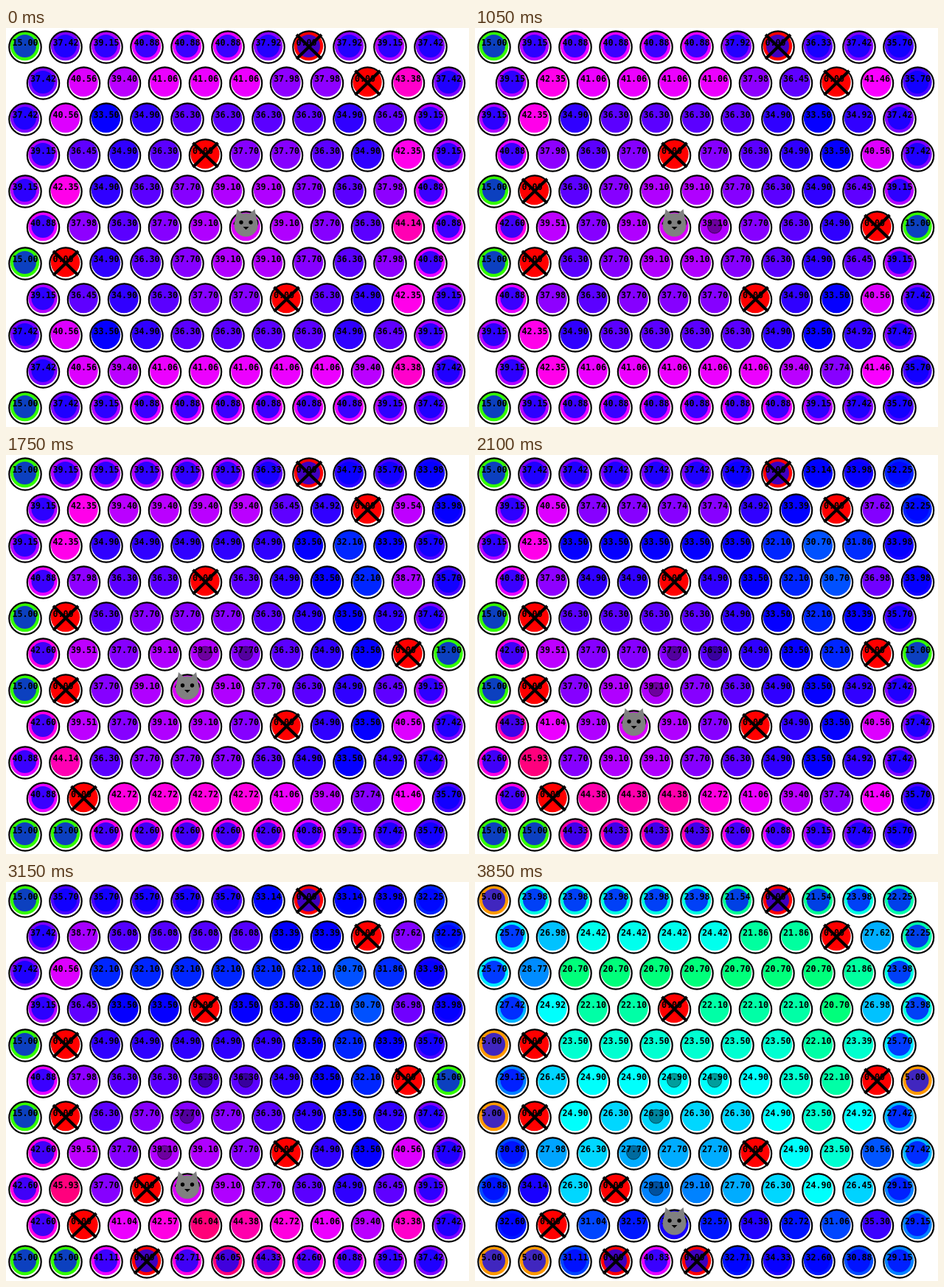
Recreate the animation shown at these times as an HTML page with a canvas. Size 628 px wide and 542 px high, loop 4200 ms.

```html
<!DOCTYPE html>
<html lang="en">
<head>
<meta charset="utf-8">
<title>Cat on a hex board</title>
<style>
  html, body { margin: 0; width: 100%; height: 100%; overflow: hidden; background: #fff; }
  canvas { display: block; width: 628px; height: 542px; }
</style>
</head>
<body>
<canvas id="board" width="628" height="542"></canvas>
<script>
const STEP_MS = 350, SIZE = 11, LAST = SIZE - 1;
const ctx = document.getElementById('board').getContext('2d');

// Opening position, then turns as [row, column]: a wall, a cat move, a wall, ...
const catStart = [5, 5];
const openingWalls = [[0, 7], [1, 8], [3, 4], [6, 1], [7, 6]];
const turns = [
  [5, 9], [5, 4], [4, 1], [6, 4], [9, 1], [7, 3],
  [8, 3], [8, 4], [10, 3], [9, 4], [10, 5]
];
const STEPS = turns.length + 1;

const cells = Array.from({ length: SIZE * SIZE }, (_, i) => [Math.floor(i / SIZE), i % SIZE]);
const column = ([r, c]) => c + (r % 2) / 2;
const cellX = ([r, c]) => 26 + 55 * c + (r % 2) * 24.5;
const cellY = ([r]) => 26 + 49 * r;
const isEdge = ([r, c]) => r === 0 || c === 0 || r === LAST || c === LAST;

function distance(a, b) {
  const rows = Math.abs(a[0] - b[0]);
  return rows + Math.max(0, Math.abs(column(a) - column(b)) - rows / 2);
}

const neighbours = cell => cells.filter(other => distance(cell, other) === 1);

function boardAt(step) {
  const played = turns.slice(0, step);
  const trail = [catStart, ...played.filter((_, i) => i % 2 === 1)];
  const walls = [...openingWalls, ...played.filter((_, i) => i % 2 === 0)];
  const isWall = ([r, c]) => walls.some(w => w[0] === r && w[1] === c);
  return { cat: trail.pop(), trail, isWall };
}

// Cells near open edges score higher, cells far from the cat lower;
// every exit left open beside the cat costs ten points.
function score(cell, { cat, isWall }) {
  if (isWall(cell)) return 0;
  const open = neighbours(cell).filter(n => !isWall(n));
  const openEdges = open.filter(isEdge).length;
  const exits = neighbours(cat).filter(n => isEdge(n) && !isWall(n) && distance(n, cell) > 0);
  const penalty = 10 * exits.length;
  if (isEdge(cell) && openEdges === open.length) return 15 - penalty;
  const pull = isEdge(cell) ? 0.5 + Math.min(2, openEdges) : openEdges;
  return 40.5 + 3.6 * pull - (1.4 + 0.13 * pull) * distance(cat, cell) - penalty;
}

function disc(x, y, radius, fill, stroke, width) {
  ctx.beginPath();
  ctx.arc(x, y, radius, 0, Math.PI * 2);
  if (fill) { ctx.fillStyle = fill; ctx.fill(); }
  if (stroke) { ctx.strokeStyle = stroke; ctx.lineWidth = width; ctx.stroke(); }
}

function polygon(fill, points) {
  ctx.beginPath();
  points.forEach(([x, y]) => ctx.lineTo(x, y));
  ctx.fillStyle = fill;
  ctx.fill();
}

function drawCross(x, y) {
  ctx.beginPath();
  for (const side of [-17, 17]) {
    ctx.moveTo(x + side, y - 17);
    ctx.lineTo(x - side, y + 16);
  }
  ctx.strokeStyle = '#000';
  ctx.lineWidth = 4;
  ctx.stroke();
}

function drawCell(cell, board) {
  const x = cellX(cell), y = cellY(cell), value = score(cell, board);
  disc(x - 0.5, y - 1.5, 19.7, `hsl(${value * 7.2}, 100%, 50%)`);
  if (isEdge(cell)) disc(x - 0.5, y - 1.5, 15.5, 'rgba(0, 0, 255, 0.75)');
  disc(x, y, 21.7, null, '#000', 2.2);
  ctx.fillStyle = '#000';
  ctx.fillText(value.toFixed(2), x - 17.5, y - 2.5);
  if (board.isWall(cell)) drawCross(x, y);
}

function drawCat(cell) {
  const fur = '#808080';
  ctx.save();
  ctx.translate(cellX(cell), cellY(cell));
  disc(0, -3.5, 16, fur);
  for (const side of [-1, 1]) {
    polygon(fur, [[side * 15, -8], [side * 12, -25], [side * 3, -17]]);
    disc(side * 6.5, -7, 2.7, '#000');
  }
  polygon('#000', [[-4, -1], [4, -1], [0, 3]]);
  ctx.restore();
}

function draw(step) {
  const board = boardAt(step);
  ctx.fillStyle = '#fff';
  ctx.fillRect(0, 0, 628, 542);
  ctx.font = 'bold 11.65px "DejaVu Sans Mono", monospace';
  cells.forEach(cell => drawCell(cell, board));
  for (const cell of board.trail)
    disc(cellX(cell) - 0.5, cellY(cell) - 1.5, 9.5, 'rgba(0, 0, 0, 0.38)', 'rgba(0, 0, 0, 0.55)', 1);
  drawCat(board.cat);
}

let shown = -1;
const start = performance.now();
function tick(now) {
  const step = Math.floor(Math.max(0, now - start) / STEP_MS) % STEPS;
  if (step !== shown) draw(shown = step);
  requestAnimationFrame(tick);
}
tick(start);
</script>
</body>
</html>
```
